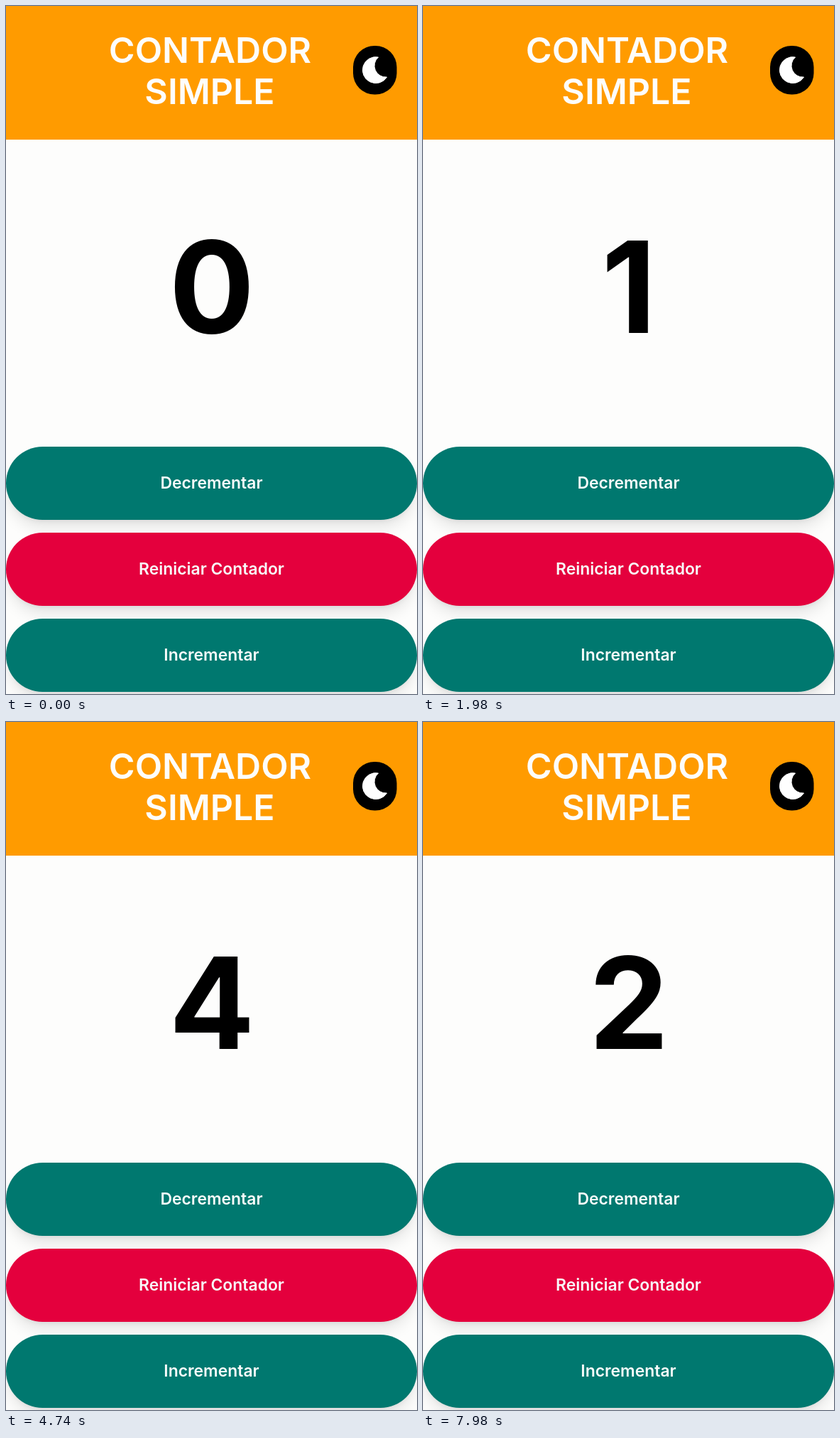
Animation of 579 by 968 pixels, one loop 8000 ms. Source, as an HTML page:

```html
<!DOCTYPE html>
<html lang="es">
<head>
<meta charset="utf-8">
<title>Contador simple</title>
<style>
  html, body { margin: 0; width: 100%; height: 100%; overflow: hidden; background: #fdfdfc; }
  body { position: relative; font-family: Inter, sans-serif; font-weight: 600; }
  header { position: absolute; inset: 0 0 auto; height: 188px; background: #ff9b00; }
  svg { position: absolute; left: 0; top: 0; }
  text { text-anchor: middle; fill: #fdfdfc; }
  .title { font-size: 50px; }
  #count { font-size: 178.5px; font-weight: 700; fill: #000; }
  .button {
    position: absolute; left: 0; width: 100%; height: 103.5px; line-height: 103.5px;
    border-radius: 52px; text-align: center; font-size: 22.9px;
    color: #f8fbfa; background: #00786f;
    box-shadow: 0 14px 21px -4px #0000001a, 0 6px 9px -6px #0000001a;
  }
  .reset { background: #e4003d; }
</style>
</head>
<body>
<header></header>
<div class="button" style="top:619.8px">Decrementar</div>
<div class="button reset" style="top:740.6px">Reiniciar Contador</div>
<div class="button" style="top:861.5px">Incrementar</div>
<svg width="579" height="968" viewBox="0 0 579 968">
  <text class="title" x="287.5" y="80.3">CONTADOR</text>
  <text class="title" x="287" y="137.8">SIMPLE</text>
  <rect x="489" y="56" width="61.5" height="68.5" rx="30"/>
  <path d="M524.5 72A18.5 18.5 0 1 0 536.5 100A16 16 0 0 1 524.5 72Z"
        fill="#fff" stroke="#fff" stroke-linejoin="round"/>
  <text id="count" x="290" y="460">0</text>
</svg>
<script>
  const LOOP = 8000;
  // Times of the presses on each button, in ms
  const increments = [1620, 2420, 3260, 4100, 4940];
  const decrements = [6300, 6980, 7580];
  const count = document.getElementById('count');
  const start = performance.now();

  const pressed = (times, t) => times.filter(time => time <= t).length;

  function draw() {
    const t = (performance.now() - start) % LOOP;
    const value = String(pressed(increments, t) - pressed(decrements, t));
    if (count.textContent !== value) count.textContent = value;
    requestAnimationFrame(draw);
  }
  draw();
</script>
</body>
</html>
```
